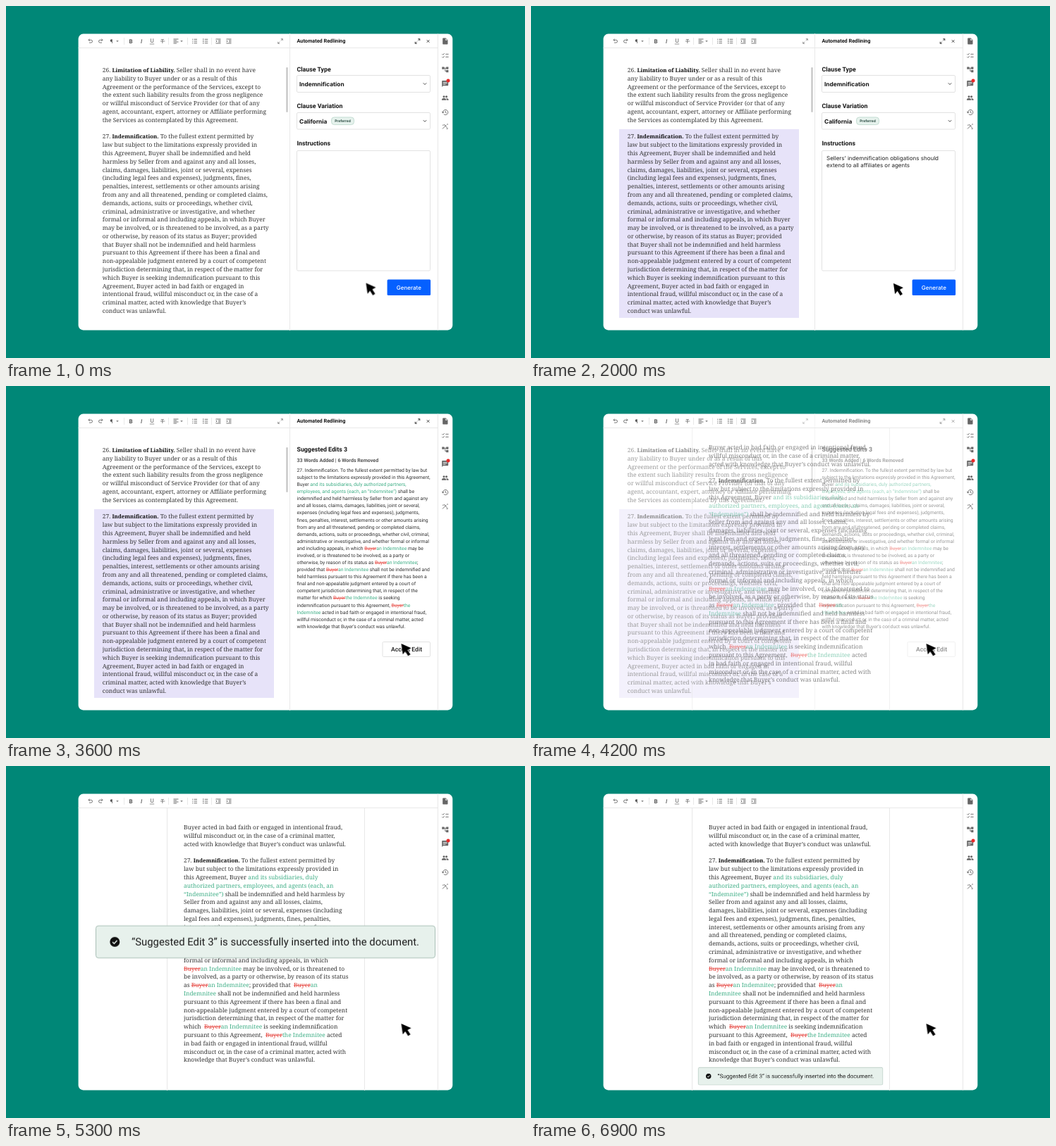
Recreate the animation shown at these times as an HTML page. Size 736x500 px, loop 7 s.

```html
<!DOCTYPE html>
<html lang="en">
<head>
<meta charset="utf-8">
<title>Automated Redlining</title>
<style>
html, body { margin: 0; width: 100%; height: 100%; overflow: hidden; background: #008777; }
svg { display: block; width: 736px; height: 500px; }
text { white-space: pre; text-rendering: geometricPrecision; font-family: Roboto, sans-serif; }
.doc { font: 8.4px "Noto Serif", serif; fill: #333; }
.doc .bold { font-size: 7.8px; font-weight: 700; fill: #111; }
.edits { font-size: 6.82px; fill: #333; }
.add { fill: #3fae86; }
.del { fill: #e5453f; text-decoration: line-through; }
.label { font-size: 8.8px; font-weight: 700; fill: #161616; }
.inter { font-family: Inter, sans-serif; font-size: 8px; fill: #222; }
.value { font-size: 8.3px; font-weight: 700; fill: #161616; }
.box { fill: #fff; stroke: #e2e2e2; }
.rule { stroke: #e8e8e8; fill: none; }
.line { fill: none; stroke: #666; stroke-width: .9; }
.dark { stroke: #333; }
.glyph { font-size: 8px; fill: #555; text-anchor: middle; }
.icon { fill: #666; }

.mark, .form, .result, .editor, .merged, .toast, .pointer {
  animation: 7s linear infinite;
}
.mark { animation-name: mark; }
.form { animation-name: form; }
.result { animation-name: result; }
.editor { animation-name: editor; }
.merged { animation-name: merged; }
.toast { animation-name: toast; }
.pointer { animation-name: pointer; animation-timing-function: ease-in-out; }

@keyframes mark { 0%, 1.43% { opacity: 0 } 5.71%, 100% { opacity: 1 } }
@keyframes form { 0%, 34.29% { opacity: 1 } 42.86%, 100% { opacity: 0 } }
@keyframes result { 0%, 34.29% { opacity: 0 } 42.86%, 100% { opacity: 1 } }
@keyframes editor { 0%, 55.71% { opacity: 1 } 64.29%, 100% { opacity: 0 } }
@keyframes merged { 0%, 55.71% { opacity: 0 } 62.86%, 100% { opacity: 1 } }
@keyframes pointer {
  0%, 27% { transform: translate(510.5px, 393.5px) }
  33%, 45.71% { transform: translate(534px, 396px) }
  50.7%, 100% { transform: translate(560.5px, 366px) }
}
@keyframes toast {
  0%, 65.71% { opacity: 0; transform: translate(368px, 440.6px) scale(.544) }
  68.57%, 69.29% { opacity: 1; transform: translate(368px, 440.6px) scale(.544); animation-timing-function: ease-in-out }
  74.29%, 81.43% { opacity: 1; transform: translate(368px, 249.8px); animation-timing-function: ease-in-out }
  90%, 100% { opacity: 1; transform: translate(368px, 440.6px) scale(.544) }
}
</style>
</head>
<body>
<svg viewBox="0 0 736 500">
  <defs>
    <rect id="sheet" x="102.6" y="39.6" width="530.7" height="420.8" rx="7"/>
    <clipPath id="card"><use href="#sheet"/></clipPath>
    <path id="expand" d="M.8-.8 3.2-3.2M.8-3.3H3.3V-.8M-.8.8-3.2 3.2M-3.3.8V3.3H-.8"/>
    <path id="chevron" d="M-2.2-1.1 0 1.1 2.2-1.1"/>
    <path id="undo" d="M117 48.3h3.6a1.9 1.9 0 0 1 0 3.8h-2.6M118.7 46.6 117 48.3l1.7 1.7"/>
    <path id="indent" d="M-3.5-3h7M0-1h3.5M0 1h3.5M-3.5 3h7M-3.3-1.2-1.8 0-3.3 1.2"/>
    <path id="caret" fill="#666" d="M-1.8-.8h3.6L0 1z"/>
  </defs>

  <rect width="736" height="500" fill="#008777"/>
  <use href="#sheet" fill="#fff"/>

  <g clip-path="url(#card)">
    <path class="rule" d="M102 59.5H612.5M612.5 39V461"/>

    <!-- toolbar -->
    <g class="line">
      <use href="#undo"/>
      <use href="#undo" transform="translate(254 0) scale(-1 1)"/>
      <path d="M237.5 47h7M237.5 49h4.5M237.5 51h7M237.5 53h4.5"/>
      <path d="M266.5 47.3h4.5M266.5 50h4.5M266.5 52.7h4.5M264 47.3h1.2M264 50h1.2M264 52.7h1.2"/>
      <path d="M281.8 47.3h4.5M281.8 50h4.5M281.8 52.7h4.5M279.8 46.3v2M279.8 49v2M279.8 51.7v2"/>
      <use href="#indent" x="301" y="50"/>
      <use href="#indent" x="316" y="50"/>
      <path d="M203.8 54h6.4M218.8 50h6.6" stroke-width=".7"/>
    </g>
    <use href="#caret" x="158" y="50"/>
    <use href="#caret" x="249" y="50"/>
    <path class="rule" d="M167.5 45v10M230.5 45v10M257.5 45v10M291.5 45v10"/>
    <g class="glyph">
      <text x="149.5" y="52.6">¶</text>
      <text x="177" y="52.8" font-weight="700">B</text>
      <text x="192" y="52.8" font-weight="500" font-style="italic">I</text>
      <text x="207" y="52.2">U</text>
      <text x="222" y="52.8">T</text>
    </g>

    <!-- sidebar -->
    <g class="icon">
      <path d="M620 45.5h3.6l2.9 2.9v5.3a.8.8 0 0 1-.8.8H620a.8.8 0 0 1-.8-.8v-7.4a.8.8 0 0 1 .8-.8zm3.3.8v2.5h2.5z" fill-rule="evenodd"/>
      <path class="line" d="M618.5 68.2l1.2 1.2 2-2.2M618.5 72.2l1.2 1.2 2-2.2M623.4 68.4h4.2M623.4 72.4h4.2"/>
      <path d="M618.3 86.6h3.2v3.2h-3.2zM624.2 86.6h3.2v3.2h-3.2zM624.2 91h3.2v3.2h-3.2z"/>
      <path class="line" d="M621 88.2h4M622.8 88.2v4.4h2"/>
      <path d="M619 106h7.4a.8.8 0 0 1 .8.8v5.6a.8.8 0 0 1-.8.8h-6.4l-1.8 1.8v-8.2a.8.8 0 0 1 .8-.8z"/>
      <path d="M619.8 108.3h5.8M619.8 109.8h5.8M619.8 111.3h3.6" stroke="#fff" stroke-width=".7"/>
      <circle cx="627" cy="106" r="2.5" fill="#ea2a2a"/>
      <circle cx="621" cy="128.7" r="1.5"/>
      <circle cx="624.6" cy="128.7" r="1.5"/>
      <path d="M618 133.7v-1c0-2.4 6-2.4 6 0v1zM624.7 133.7v-1q0-1-.6-1.5c1.8-.2 3.5.4 3.5 1.5v1z"/>
      <path class="line" d="M619.6 151a3.6 3.6 0 1 1 1.2 2.7M623.2 149v2.2l1.7 1"/>
      <path d="M617.7 150.6h3.8l-1.9 2z"/>
      <path class="line" d="M619 174.5l5.5-5.5M621 168l5 5.5M619 169.2h1.6M625.2 168h1.8M624.6 174.4h2"/>
    </g>

    <!-- clause editor -->
    <g class="editor">
      <path class="rule" d="M402.5 39V461"/>
      <use class="line" href="#expand" x="389" y="50" opacity=".75"/>
      <rect x="397.3" y="87" width="2.4" height="64" rx="1.2" fill="#c8c8c8"/>
      <rect class="mark" x="125" y="175" width="255" height="268" fill="#e7e3f9"/>
      <text class="doc" data-x="136.8" data-y="94.1" data-step="11.79">26. *Limitation of Liability.* Seller shall in no event have
any liability to Buyer under or as a result of this
Agreement or the performance of the Services, except to
the extent such liability results from the gross negligence
or willful misconduct of Service Provider (or that of any
agent, accountant, expert, attorney or Affiliate performing
the Services as contemplated by this Agreement.

27. *Indemnification.* To the fullest extent permitted by
law but subject to the limitations expressly provided in
this Agreement, Buyer shall be indemnified and held
harmless by Seller from and against any and all losses,
claims, damages, liabilities, joint or several, expenses
(including legal fees and expenses), judgments, fines,
penalties, interest, settlements or other amounts arising
from any and all threatened, pending or completed claims,
demands, actions, suits or proceedings, whether civil,
criminal, administrative or investigative, and whether
formal or informal and including appeals, in which Buyer
may be involved, or is threatened to be involved, as a party
or otherwise, by reason of its status as Buyer; provided
that Buyer shall not be indemnified and held harmless
pursuant to this Agreement if there has been a final and
non-appealable judgment entered by a court of competent
jurisdiction determining that, in respect of the matter for
which Buyer is seeking indemnification pursuant to this
Agreement, Buyer acted in bad faith or engaged in
intentional fraud, willful misconduct or, in the case of a
criminal matter, acted with knowledge that Buyer’s
conduct was unlawful.</text>

      <text class="label" x="412.5" y="52.4" style="font-size:7.3px">Automated Redlining</text>
      <use class="line dark" href="#expand" x="583.5" y="50"/>
      <path class="line dark" d="M596.8 48.2l3.6 3.6M600.4 48.2l-3.6 3.6"/>

      <g class="form">
        <text class="label" x="412.5" y="92.5">Clause Type</text>
        <rect class="box" x="412.5" y="98.5" width="189" height="24" rx="1.5"/>
        <text class="inter value" x="416" y="113.9">Indemnification</text>
        <use class="line dark" href="#chevron" x="594" y="110.5"/>
        <text class="label" x="412.5" y="145.3">Clause Variation</text>
        <rect class="box" x="412.5" y="151.5" width="189" height="23.5" rx="1.5"/>
        <text class="inter value" x="416" y="166.7">California</text>
        <rect x="461.5" y="158" width="32" height="10.6" rx="4" fill="#e6f2ed" stroke="#b9d6cb" stroke-width=".8"/>
        <text class="inter" x="466.2" y="165.1" style="font-size:4.95px;font-weight:600;fill:#16382f">Preferred</text>
        <use class="line dark" href="#chevron" x="594" y="163.3"/>
        <text class="label" x="412.5" y="198">Instructions</text>
        <rect class="box" x="412.5" y="205.5" width="189" height="170.5" rx="1.5"/>
        <text class="inter" id="line1" x="419" y="218.7"></text>
        <text class="inter" id="line2" x="419" y="229.1"></text>
        <rect x="540.6" y="388.6" width="61.5" height="22.4" rx="1.5" fill="#0560ff"/>
        <text class="inter" x="571.3" y="402.8" text-anchor="middle" style="font-weight:500;fill:#fff">Generate</text>
      </g>

      <g class="result">
        <text class="label" x="412.5" y="92.5">Suggested Edits 3</text>
        <text x="412.5" y="108.4" font-size="7.1" font-weight="700" fill="#555">33 Words Added | 6 Words Removed</text>
        <text class="edits" data-x="412.5" data-y="122" data-step="10.08">27. Indemnification. To the fullest extent permitted by law but
subject to the limitations expressly provided in this Agreement,
Buyer {and its subsidiaries, duly authorized partners,}
{employees, and agents (each, an “Indemnitee”)} shall be
indemnified and held harmless by Seller from and against any
and all losses, claims, damages, liabilities, joint or several,
expenses (including legal fees and expenses), judgments,
fines, penalties, interest, settlements or other amounts arising
from any and all threatened, pending or completed claims,
demands, actions, suits or proceedings, whether civil, criminal,
administrative or investigative, and whether formal or informal
and including appeals, in which [Buyer]{an Indemnitee} may be
involved, or is threatened to be involved, as a party or
otherwise, by reason of its status as [Buyer]{an Indemnitee};
provided that [Buyer]{an Indemnitee} shall not be indemnified and
held harmless pursuant to this Agreement if there has been a
final and non-appealable judgment entered by a court of
competent jurisdiction determining that, in respect of the
matter for which [Buyer]{the Indemnitee} is seeking
indemnification pursuant to this Agreement, [Buyer]{the}
{Indemnitee} acted in bad faith or engaged in intentional fraud,
willful misconduct or, in the case of a criminal matter, acted
with knowledge that Buyer’s conduct was unlawful.</text>
        <rect class="box" x="534" y="363.5" width="67.5" height="21" rx="1.5"/>
        <text x="568" y="377.2" text-anchor="middle" font-size="8.65" font-weight="500" fill="#161616">Accept Edit</text>
      </g>
    </g>

    <!-- merged document -->
    <g class="merged">
      <path class="rule" d="M228.5 60V461M508.5 60V461"/>
      <text class="doc" data-x="252" data-y="90.2" data-step="11.79">Buyer acted in bad faith or engaged in intentional fraud,
willful misconduct or, in the case of a criminal matter,
acted with knowledge that Buyer’s conduct was unlawful.

27. *Indemnification.* To the fullest extent permitted by
law but subject to the limitations expressly provided in
this Agreement, Buyer {and its subsidiaries, duly}
{authorized partners, employees, and agents (each, an}
{“Indemnitee”)} shall be indemnified and held harmless by
Seller from and against any and all losses, claims,
damages, liabilities, joint or several, expenses (including
legal fees and expenses), judgments, fines, penalties,
interest, settlements or other amounts arising from any
and all threatened, pending or completed claims,
demands, actions, suits or proceedings, whether civil,
criminal, administrative or investigative, and whether
formal or informal and including appeals, in which
[Buyer]{an Indemnitee} may be involved, or is threatened to
be involved, as a party or otherwise, by reason of its status
as [Buyer]{an Indemnitee}; provided that  [Buyer]{an}
{Indemnitee} shall not be indemnified and held harmless
pursuant to this Agreement if there has been a final and
non-appealable judgment entered by a court of competent
jurisdiction determining that, in respect of the matter for
which  [Buyer]{an Indemnitee} is seeking indemnification
pursuant to this Agreement,  [Buyer]{the Indemnitee} acted
in bad faith or engaged in intentional fraud, willful
misconduct or, in the case of a criminal matter, acted with
knowledge that Buyer’s conduct was unlawful.</text>
    </g>
  </g>

  <g class="toast">
    <rect x="-240.5" y="-22.8" width="481" height="45.6" rx="3.5" fill="#e7f1ec" stroke="#a9bfb6"/>
    <circle cx="-213.7" r="7" fill="#111"/>
    <path d="M-216.9.2l2.3 2.3 4.1-4.5" fill="none" stroke="#e7f1ec" stroke-width="1.5"/>
    <text x="-190" y="5.4" font-size="14.86" fill="#1c1c1c">“Suggested Edit 3” is successfully inserted into the document.</text>
  </g>

  <path class="pointer" d="M0 0 14 6.3 9 9 13 15.2 9.8 17.4 5.7 11.1 2.2 15.2z" stroke="#fff" stroke-width="1" paint-order="stroke"/>
</svg>

<script>
const LOOP = 7000, TYPE_START = 433, CHARS_PER_MS = .06;
const PROMPT = ['Sellers’ indemnification obligations should', 'extend to all affiliates or agents'];
const STYLES = { '*': 'bold', '{': 'add', '[': 'del' };

function span(parent, text, className) {
  const el = document.createElementNS('http://www.w3.org/2000/svg', 'tspan');
  el.textContent = text;
  if (className) el.setAttribute('class', className);
  return parent.appendChild(el);
}

// *bold*, {added} and [removed] runs, one row per line
function layOut(block) {
  const { x, y, step } = block.dataset;
  const rows = block.textContent.split('\n');
  block.textContent = '';
  rows.forEach((row, i) => {
    const line = span(block, '');
    line.setAttribute('x', x);
    line.setAttribute('y', +y + i * step);
    for (const run of row.split(/(\*[^*]+\*|\{[^}]+\}|\[[^\]]+\])/)) {
      if (!run) continue;
      const style = STYLES[run[0]];
      span(line, style ? run.slice(1, -1) : run, style);
    }
  });
}
document.querySelectorAll('text[data-step]').forEach(layOut);

const line1 = document.getElementById('line1');
const line2 = document.getElementById('line2');
let start;

function type(now) {
  start ??= now;
  const t = (now - start) % LOOP;
  const count = Math.max(0, Math.floor((t - TYPE_START) * CHARS_PER_MS));
  line1.textContent = PROMPT[0].slice(0, count);
  line2.textContent = PROMPT[1].slice(0, Math.max(0, count - PROMPT[0].length));
  requestAnimationFrame(type);
}
requestAnimationFrame(type);
</script>
</body>
</html>
```
